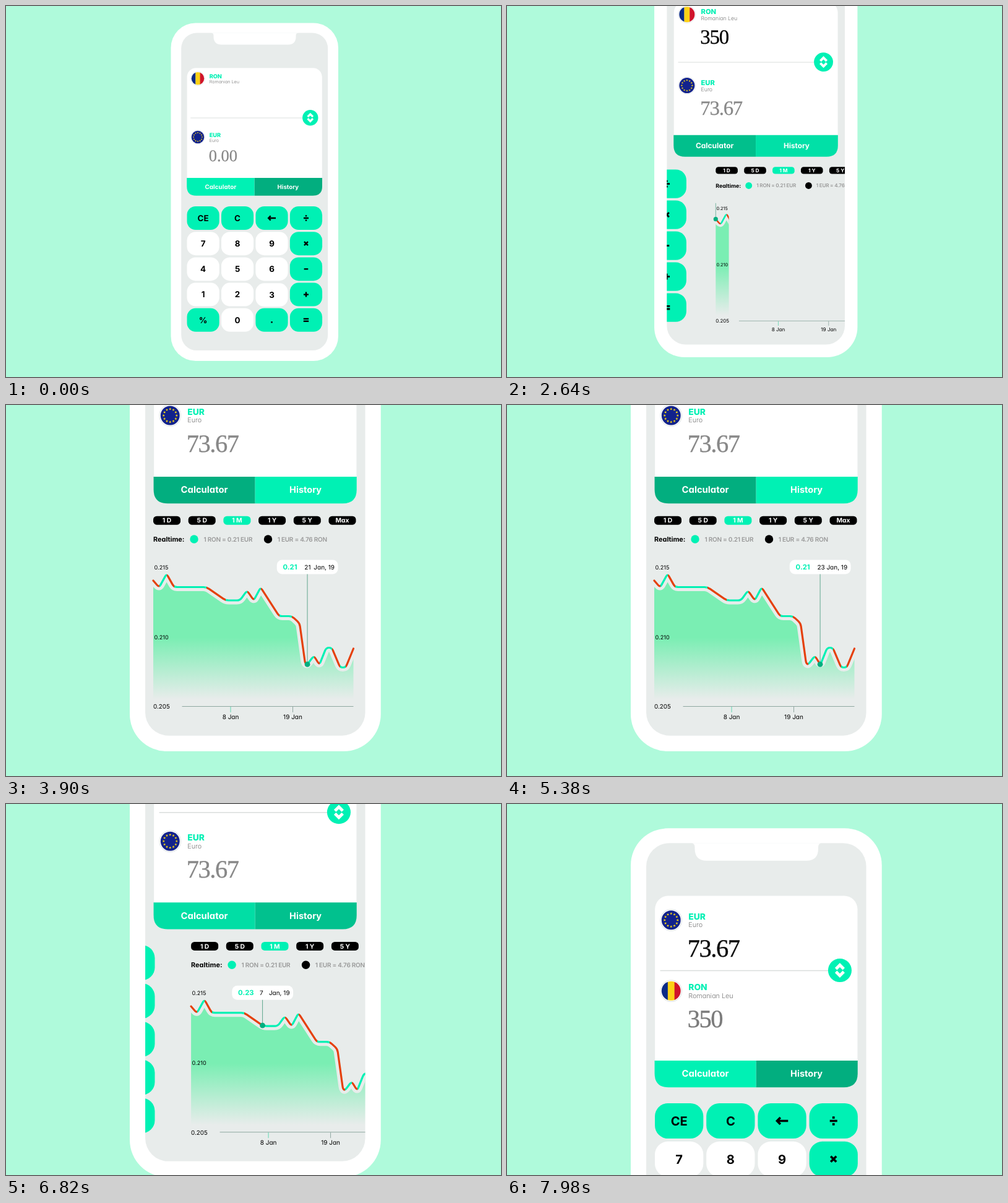
These frames come from a looping animation (800x600 px, 8 s). An HTML page:

```html
<!DOCTYPE html>
<html lang="en">
<head>
<meta charset="utf-8">
<title>Currency converter</title>
<style>
  html, body { margin: 0; width: 100%; height: 100%; overflow: hidden; background: #affadb; }
  svg { display: block; width: 800px; height: 600px; }
  text {
    font-family: Inter, "Open Sans", sans-serif;
    font-feature-settings: "cv11";
    text-rendering: geometricPrecision;
    white-space: pre;
  }
  .mid { text-anchor: middle; }
  .bold { font-weight: 700; }
  .code { font-size: 9.2px; font-weight: 800; fill: #00f0b4; }
  .name { font-size: 7.2px; font-weight: 300; fill: #777; }
  .amount { font-family: "Liberation Serif", "Times New Roman", serif; stroke-width: .25px; }
  .rate { font-size: 10px; font-weight: 600; fill: #999; letter-spacing: -.25px; }
</style>
</head>
<body>
<svg id="stage" viewBox="0 0 800 600"></svg>
<script>
const MINT = [0, 241, 180], DARK = [2, 174, 127], WHITE = [255, 255, 255];
const BLACK = [0, 0, 0], GREY = [136, 136, 136];
const mint = '#00f1b4', dark = '#02ae7f', screen = '#e8eceb', red = '#e5400c';
const LOOP = 8000, TOP = 301, SLIDE = 258.3;

const clamp = v => Math.min(1, Math.max(0, v));
const linear = (t, a, b) => clamp((t - a) / (b - a));
const mix = (a, b, p) => `rgb(${a.map((v, i) => Math.round(v + (b[i] - v) * p))})`;
function ease(t, a, b, k = 2.5) {
  const x = linear(t, a, b);
  return x < .5 ? (2 * x) ** k / 2 : 1 - (2 - 2 * x) ** k / 2;
}
const text = (x, y, str, attrs) => `<text x="${x}" y="${y}" ${attrs}>${str}</text>`;

// Keypad
const signs = {
  '←': 'M-5.5 0H6.5M-1.8-3.7L-5.4 0L-1.8 3.7',
  '÷': 'M-4 0H4M-1.25-3.6h2.5M-1.25 3.6h2.5',
  '×': 'M-3-3L3 3M3-3L-3 3',
  '-': 'M-3.3 0H3.3',
  '+': 'M-4 0H4M0-4V4',
  '=': 'M-4.2-1.9H4.2M-4.2 1.9H4.2',
  '.': 'M-1.3 3.6H1.3'
};
const labels = 'CE C ← ÷ 7 8 9 × 4 5 6 - 1 2 3 + % 0 . ='.split(' ');
const keyAt = i => [318.6 + i % 4 * 55.46, 343 + Math.floor(i / 4) * 41.2 + (labels[i] === '3' ? .7 : 0)];
const keys = labels.map((label, i) => {
  const face = signs[label]
    ? `<path d="${signs[label]}" fill="none" stroke="#000" stroke-width="2.4"/>`
    : text(0, 4.8, label, 'class="mid bold" font-size="13.4"');
  return `<g id="key${i}" transform="translate(${keyAt(i)})">
    <rect x="-26.1" y="-19" width="52.2" height="38" rx="14" fill="${/\d/.test(label) ? '#fff' : mint}"/>${face}</g>`;
}).join('');

// Flags and currency rows
const star = 'M' + [...Array(10)].map((_, i) => {
  const r = i % 2 ? .6 : 1.5, a = i * Math.PI / 5;
  return `${r * Math.sin(a)} ${-r * Math.cos(a)}`;
}).join('L') + 'Z';
const stars = [...Array(12)].map((_, i) => {
  const a = i * Math.PI / 6;
  return `<path d="${star}" fill="#fbd90f" transform="translate(${7 * Math.sin(a)} ${-7 * Math.cos(a)})"/>`;
}).join('');
const stripes = ['#0a2a86', '#fcd116', '#d0142a'].map((c, i) =>
  `<rect x="${[-11, -3.6, 3.6][i]}" y="-11" width="7.5" height="22" fill="${c}"/>`).join('');
const row = (id, y, flag, code, name) => `<g id="${id}">
  <g transform="translate(310 ${y})">
    <circle r="11.5" fill="#fff" stroke="#dde2e4" stroke-width=".7"/>
    <g clip-path="url(#round)">${flag}</g>
  </g>
  ${text(328.7, y - .5, code, 'class="code"')}
  ${text(328.7, y + 7.6, name, 'class="name"')}
  <text id="${id}Sum" class="amount" x="327.7" y="${y + 39.3}"></text></g>`;

// Chart
const pts = [[238, 284], [247.5, 295], [259.5, 273], [271.5, 294.5], [324, 294.5], [355, 316], [378, 316],
  [389.5, 300], [400.5, 316], [411.5, 295], [441.5, 341.5], [462, 341.5], [474.5, 353], [483.5, 418],
  [487, 419.5], [497.5, 405.5], [506.5, 420], [517.5, 392.5], [526.5, 392.5], [540, 424.5], [549, 424.5], [561.5, 394]];
const toward = (p, q) => {
  const d = Math.hypot(q[0] - p[0], q[1] - p[1]), f = Math.min(5, d / 2) / d;
  return [p[0] + (q[0] - p[0]) * f, p[1] + (q[1] - p[1]) * f];
};
const curve = 'M' + pts[0] + pts.slice(1, -1).map((p, i) =>
  `L${toward(p, pts[i])}Q${p} ${toward(p, pts[i + 2])}`).join('') + 'L' + pts.at(-1);
const share = x => (x - 238) / 323.5;
const stops = pts.slice(1).map((p, i) => {
  const c = p[1] > pts[i][1] || i === pts.length - 2 ? red : mint;
  return `<stop offset="${share(pts[i][0])}" stop-color="${c}"/><stop offset="${share(p[0])}" stop-color="${c}"/>`;
}).join('');
function heightAt(x) {
  const i = Math.max(1, pts.findIndex(p => p[0] >= x));
  const [a, b] = [pts[i - 1], pts[i]];
  return a[1] + (b[1] - a[1]) * (x - a[0]) / (b[0] - a[0]);
}
const pills = ['1 D', '5 D', '1 M', '1 Y', '5 Y', 'Max'].map((s, i) => {
  const x = 238 + i * 56.7;
  return `<rect x="${x}" y="179.7" width="44" height="14" rx="5.5" fill="${i === 2 ? mint : '#000'}"/>` +
    text(x + 22, 190.3, s, 'class="mid bold" font-size="10.3" fill="#fff"');
}).join('');

const history = `<g id="history">${pills}
  ${text(238, 221, 'Realtime:', 'class="bold" font-size="10.9"')}
  <circle cx="304" cy="217" r="6.7" fill="${mint}"/>
  ${text(319.5, 220.7, '1 RON = 0.21 EUR', 'class="rate"')}
  <circle cx="423.5" cy="217" r="6.7"/>
  ${text(438.7, 220.7, '1 EUR = 4.76 RON', 'class="rate"')}
  <g clip-path="url(#drawn)">
    <path d="${curve}V480H238Z" fill="url(#fade)"/>
    <path d="${curve}" fill="none" stroke="${screen}" stroke-width="13"/>
    <path d="${curve}" fill="none" stroke="url(#trend)" stroke-width="3.2" stroke-linecap="round"/>
  </g>
  <path d="M284.5 487.5H561.5M463.5 488V497" stroke="#8fa7a0"/>
  <path d="M363 488V497" stroke="#5fd6b0"/>
  ${text(239.5, 265.5, '0.215', 'font-size="9.1"')}
  ${text(239.5, 378.5, '0.210', 'font-size="9.1"')}
  ${text(238, 491.3, '0.205', 'font-size="9.8"')}
  ${text(363, 507.8, '8 Jan', 'class="mid" font-size="10"')}
  ${text(463.5, 507.8, '19 Jan', 'class="mid" font-size="10"')}
  <g id="marker">
    <path id="stem" stroke="#5fa68d"/>
    <circle id="dot" r="4.4" fill="${dark}"/>
    <g id="bubble">
      <rect x="-49.3" y="250.5" width="98.8" height="23" rx="8.5" fill="#fff"/>
      <text id="value" x="-39.5" y="266" class="bold" font-size="11.3" fill="${mint}"></text>
      <text id="day" x="-4.7" y="265.6" font-size="10"></text>
      <text id="month" x="10.3" y="265.6" font-size="10"></text>
    </g>
  </g></g>`;

document.getElementById('stage').innerHTML = `
<defs>
  <clipPath id="round"><circle r="10.3"/></clipPath>
  <clipPath id="inside"><rect x="283.2" y="43.5" width="237" height="513.6" rx="25"/></clipPath>
  <clipPath id="drawn"><rect id="reveal" x="230" y="230" height="260"/></clipPath>
  <linearGradient id="fade" gradientUnits="userSpaceOnUse" x1="0" y1="376" x2="0" y2="476">
    <stop stop-color="#7aeeb3"/><stop offset="1" stop-color="#7aeeb3" stop-opacity="0"/>
  </linearGradient>
  <linearGradient id="trend" gradientUnits="userSpaceOnUse" x1="238" y1="0" x2="561.5" y2="0">${stops}</linearGradient>
</defs>
<g id="phone">
  <rect x="266.5" y="27.5" width="270.5" height="546.5" rx="40" fill="#fff"/>
  <g clip-path="url(#inside)">
    <rect x="283" y="43" width="238" height="515" fill="${screen}"/>
    <path d="M331 43Q335.5 43.5 335.5 48V49.5Q335.5 62.5 348.5 62.5H455.5Q468.5 62.5 468.5 49.5V48Q468.5 43.5 473 43Z" fill="#fff"/>
    <rect x="292.6" y="100.3" width="218.2" height="206" rx="14.5" fill="#fff"/>
    <path id="tabL" d="M401.6 278V306.8H307.2Q292.2 306.8 292.2 291.8V278Z"/>
    <path id="tabR" d="M401.6 278V306.8H496Q511 306.8 511 291.8V278Z"/>
    ${text(346.9, 295.6, 'Calculator', 'class="mid bold" font-size="9.9" fill="#fff"')}
    ${text(455.9, 295.6, 'History', 'class="mid bold" font-size="9.7" fill="#fff"')}
    <path d="M298.2 181H480" stroke="#d9dddc" stroke-width=".9"/>
    ${row('ron', 117.3, stripes, 'RON', 'Romanian Leu')}
    ${row('eur', 212, '<circle r="11" fill="#12228c"/>' + stars, 'EUR', 'Euro')}
    <g id="swap">
      <circle r="12.7" fill="${mint}"/>
      <path d="M-4.2-1.5L0-5.7L4.2-1.5M-4.2 1.5L0 5.7L4.2 1.5" fill="none" stroke="#fff" stroke-width="3.2"/>
    </g>
    <g id="keypad">${keys}</g>
    ${history}
  </g>
</g>`;

const el = {};
document.querySelectorAll('[id]').forEach(e => el[e.id] = e);
const set = (id, attrs) => Object.entries(attrs).forEach(([k, v]) => el[id].setAttribute(k, v));
const write = (id, str) => { if (el[id].textContent !== str) el[id].textContent = str; };

const presses = [['3', 200], ['5', 450], ['0', 700]];
const sums = ['0.00', '0.63', '7.37', '73.67'];

function typeKeys(t) {
  let typed = '';
  for (const [digit, start] of presses) {
    const i = labels.indexOf(digit), push = Math.sin(Math.PI * linear(t, start, start + 240));
    set('key' + i, { transform: `translate(${keyAt(i)}) scale(${1 - .15 * push})` });
    el['key' + i].firstElementChild.setAttribute('fill', mix(WHITE, MINT, push));
    if (t >= start + 120) typed += digit;
  }
  write('ronSum', typed);
  write('eurSum', sums[typed.length]);
  const spread = { 'font-size': 27, 'letter-spacing': -1 };
  set('ronSum', spread);
  set('eurSum', typed ? spread : { 'font-size': 26.5, 'letter-spacing': 0 });
}

function moveMarker(t) {
  const x = 238 + 323.5 * ease(t, 2650, 4625) - 208 * ease(t, 4625, 6570);
  const y = heightAt(x), day = Math.round(7 + (x - 353.5) / 9.46);
  set('marker', { transform: `translate(${x} 0)` });
  set('stem', { d: `M0 252V${y}` });
  set('dot', { cy: y });
  set('bubble', { opacity: linear(t, 2680, 2900) });
  write('value', (.23 - (y - 314.5) / 105 * .02).toFixed(2));
  write('day', String(day > 0 ? day : day + 31));
  write('month', day > 0 ? 'Jan, 19' : 'Dec, 18');
}

function draw(t) {
  const zoom = ease(t, 2300, 3026), back = ease(t, 6625, 7269);
  const slide = ease(t, 2300, 2832) - ease(t, 6625, 7247);
  const tab = ease(t, 2300, 2850) - ease(t, 6625, 6950);
  const swap = ease(t, 7670, 8090);
  set('phone', { transform: `translate(${-199.75 * zoom} ${-TOP * zoom + 299 * back}) scale(${1 + zoom / 2})` });
  set('keypad', { transform: `translate(${-SLIDE * slide} 0)` });
  set('history', { transform: `translate(${133.17 + SLIDE * (1 - slide)} 200.67) scale(${2 / 3})` });
  set('tabL', { fill: mix(MINT, DARK, tab) });
  set('tabR', { fill: mix(DARK, MINT, tab) });
  set('reveal', { width: 8 + 326 * ease(t, 2400, 3400) });
  set('ron', { transform: `translate(0 ${94.7 * swap})` });
  set('eur', { transform: `translate(0 ${-94.7 * swap})` });
  const ink = mix(BLACK, GREY, swap), faint = mix(GREY, BLACK, swap);
  set('ronSum', { fill: ink, stroke: ink });
  set('eurSum', { fill: faint, stroke: faint });
  const push = Math.sin(Math.PI * linear(t, 7670, 7900));
  set('swap', { transform: `translate(491.8 180.7) scale(${1 - .1 * push})` });
  typeKeys(t);
  moveMarker(t);
}

const begin = performance.now();
function tick() {
  draw((performance.now() - begin) % LOOP);
  requestAnimationFrame(tick);
}
tick();
</script>
</body>
</html>
```
